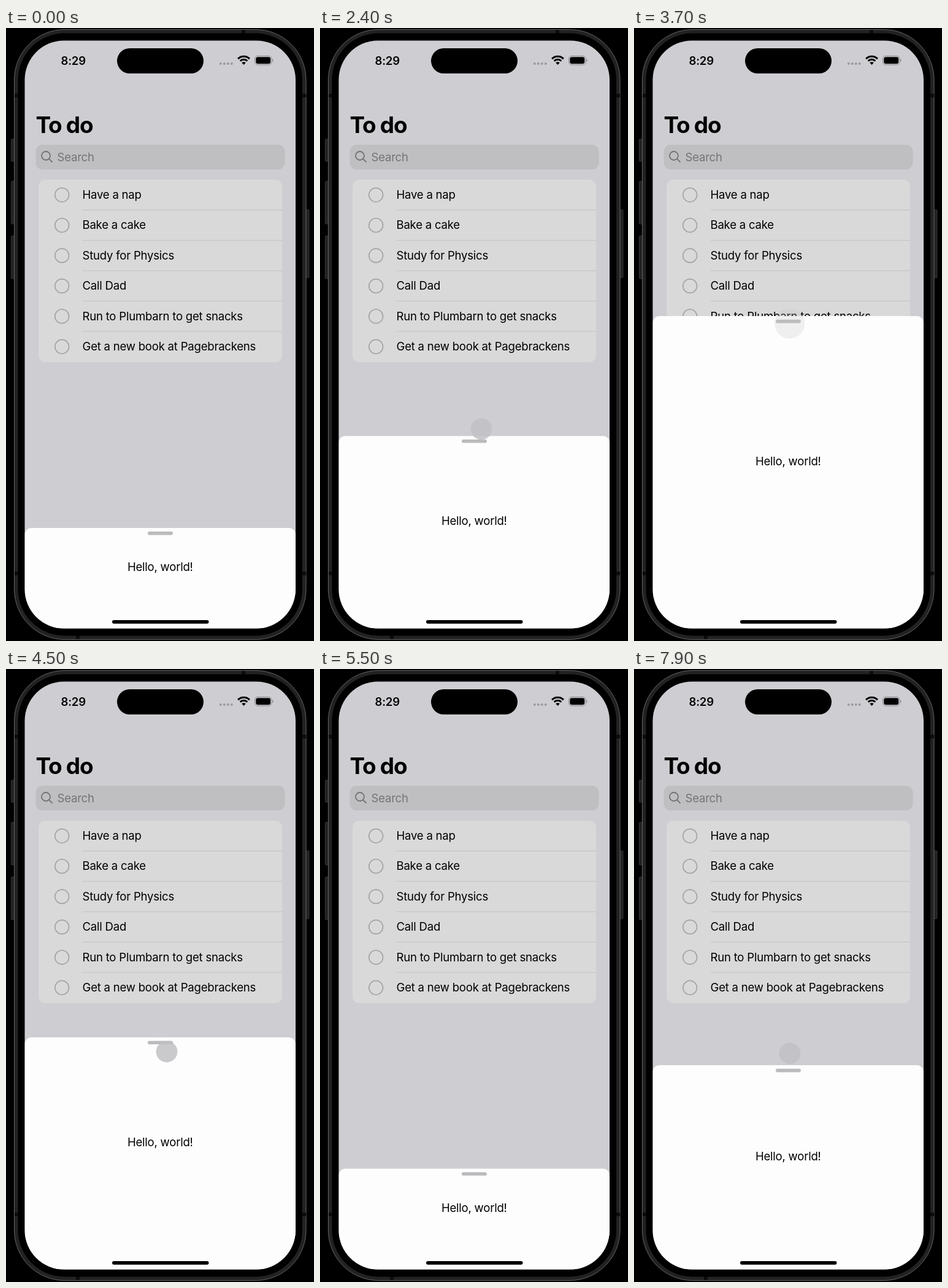
Recreate the animation shown at these times as an HTML page. Size 502 by 998 pixels, loop 8000 ms.

```html
<!DOCTYPE html>
<html lang="en">
<head>
<meta charset="utf-8">
<title>To do</title>
<style>
  html, body { margin: 0; width: 100%; height: 100%; overflow: hidden; background: #000; }
  svg { display: block; width: 100%; height: 100%; }
  text { font: 400 18.6px Inter, "Open Sans", sans-serif; letter-spacing: -.013em; }
  .title { font-size: 37px; font-weight: 700; letter-spacing: -.035em; }
  .time { font-weight: 600; }
  .key { fill: #222; stroke: #3c3c3c; stroke-width: .8; }
  .antenna { fill: #0c0c0c; }
  .line { fill: none; stroke-linecap: round; }
</style>
</head>
<body>
<svg viewBox="0 0 502 998">
  <defs>
    <clipPath id="screen"><rect x="30.5" y="20.5" width="441.5" height="957" rx="64"/></clipPath>
  </defs>

  <g id="phone">
    <rect class="key" x="8.5" y="181" width="6" height="36" rx="1"/>
    <rect class="key" x="8.5" y="249.500" width="6" height="69.500" rx="1"/>
    <rect class="key" x="8.5" y="338.500" width="6" height="69.500" rx="1"/>
    <rect class="key" x="488" y="296" width="6" height="110.500" rx="1"/>
    <rect x="13.5" y="2.5" width="475.500" height="993" rx="82" fill="#222" stroke="#646464"/>
    <rect class="antenna" x="14" y="107" width="6" height="6"/>
    <rect class="antenna" x="483" y="107" width="6" height="6"/>
    <rect class="antenna" x="14" y="885" width="6" height="6"/>
    <rect class="antenna" x="483" y="885" width="6" height="6"/>
    <rect class="antenna" x="384" y="3" width="6" height="6"/>
    <rect class="antenna" x="114" y="989" width="6" height="6"/>
    <rect x="19.5" y="8.5" width="463.500" height="981" rx="76"/>
  </g>

  <g clip-path="url(#screen)">
    <rect x="30" y="20" width="443" height="958" fill="#cecdd2"/>

    <text class="time" x="89.500" y="60">8:29</text>
    <rect x="181" y="33" width="141" height="41" rx="20.500"/>
    <g id="dots" fill="#9b9a9f"></g>
    <g class="line" style="stroke-linecap:butt" stroke="#000" stroke-width="3">
      <path d="M378.100 50.100a13.300 13.300 0 0 1 18.800 0"/>
      <path d="M381.700 53.700a8.200 8.200 0 0 1 11.600 0"/>
      <path d="M387.500 60l-3.200-3.400a4.600 4.600 0 0 1 6.400 0z" fill="#000" stroke="none"/>
    </g>
    <rect x="405.500" y="45.500" width="27.500" height="14.500" rx="4.500" fill="none" stroke="#88878b"/>
    <rect x="407.300" y="47.300" width="23.900" height="10.900" rx="3"/>
    <path d="M434.300 50.300q3 2.500 0 5z" fill="#88878b"/>

    <text class="title" x="48.500" y="171">To do</text>

    <rect x="48.500" y="190" width="406" height="40.300" rx="11" fill="#bfbfc1"/>
    <g class="line" stroke="#737376" stroke-width="1.800">
      <circle cx="65" cy="208" r="7"/>
      <path d="M70.200 213.200l4.800 4.800"/>
    </g>
    <text x="83.500" y="217" fill="#747477">Search</text>

    <rect x="53" y="247" width="397" height="297" rx="11" fill="#d9d9d9"/>
    <g id="rows"></g>

    <g id="sheet">
      <rect x="30.500" width="441.500" height="1000" rx="11" fill="#fdfdfd"/>
      <rect x="231" y="5.800" width="41" height="5.600" rx="2.800" fill="#bbbbbd"/>
    </g>
    <text id="hello" x="251.300" text-anchor="middle">Hello, world!</text>
    <rect x="173" y="964" width="157.500" height="5.700" rx="2.850"/>
    <circle id="touch" fill="#c1c1c4"/>
  </g>
</svg>

<script>
const LOOP = 8000, STEP = 100, REST = 814;
const NS = "http://www.w3.org/2000/svg";
const $ = id => document.getElementById(id);

function add(parent, tag, attrs, text) {
  const el = document.createElementNS(NS, tag);
  for (const k in attrs) el.setAttribute(k, attrs[k]);
  if (text) el.textContent = text;
  parent.append(el);
}

for (let i = 0; i < 4; i++) add($("dots"), "circle", { cx: 349.8 + i * 6, cy: 58, r: 2 });

["Have a nap", "Bake a cake", "Study for Physics", "Call Dad",
 "Run to Plumbarn to get snacks", "Get a new book at Pagebrackens"].forEach((label, i) => {
  const y = i * 49.43, rows = $("rows");
  add(rows, "circle", { cx: 91.2, cy: 271.7 + y, r: 11.4, fill: "none", stroke: "#a5a5a7", "stroke-width": 1.7 });
  add(rows, "text", { x: 124.5, y: 278 + y }, label);
  if (i) add(rows, "rect", { x: 125, y: 246.4 + y, width: 325, height: 1, fill: "#c0c0c2" });
});

// Keys are [time, value, ease]: a positive ease is a power curve, a negative one an exponential settle.
const sheetTop = [
  [0, REST], [1700, REST], [2600, 538, 2.43], [3200, 469, -6],
  [3800, 469], [4000, 456], [4700, 694, 1.5], [5600, REST, -6],
  [7300, REST], [7900, 645, 2], [LOOP, 600]
];
const touchY = [
  [0, 824.5], [1700, 824.5], [2400, 653, 2.3], [2600, 535], [2700, 520],
  [3700, 481], [3800, 481], [4000, 468], [4500, 623, 1.5], [4800, 760],
  [7000, 823], [7300, 823], [7900, 626, 2], [LOOP, 580]
];
const touchX = [
  [0, 261.5], [1700, 261.5], [2400, 263], [3700, 253.7], [4500, 262],
  [7000, 259.7], [7300, 259.7], [LOOP, 253]
];
const presses = [[1500, 2700], [3700, 4800], [7000, LOOP]];

function at(keys, t) {
  const i = keys.findIndex(k => k[0] > t);
  const [t0, v0] = keys[i - 1], [t1, v1, ease = 1] = keys[i];
  const u = (t - t0) / (t1 - t0);
  return v0 + (v1 - v0) * (ease > 0 ? u ** ease : 1 - Math.exp(ease * u));
}

function draw(now) {
  const t = Math.floor(now % LOOP / STEP) * STEP;
  const top = at(sheetTop, t);
  $("sheet").setAttribute("transform", `translate(0 ${top})`);
  $("hello").setAttribute("y", 884 + (top - REST) / 2);

  const press = presses.find(([down, up]) => t >= down && t <= up);
  const touch = $("touch");
  touch.setAttribute("visibility", press ? "visible" : "hidden");
  if (press) {
    const faint = t === press[0] || t === press[1];
    touch.setAttribute("cx", at(touchX, t));
    touch.setAttribute("cy", at(touchY, t));
    touch.setAttribute("r", faint ? 24.6 : 17.4);
    touch.setAttribute("opacity", faint ? 0.25 : 0.83);
  }
}

const start = performance.now();
function tick() {
  draw(performance.now() - start);
  requestAnimationFrame(tick);
}
tick();
</script>
</body>
</html>
```
